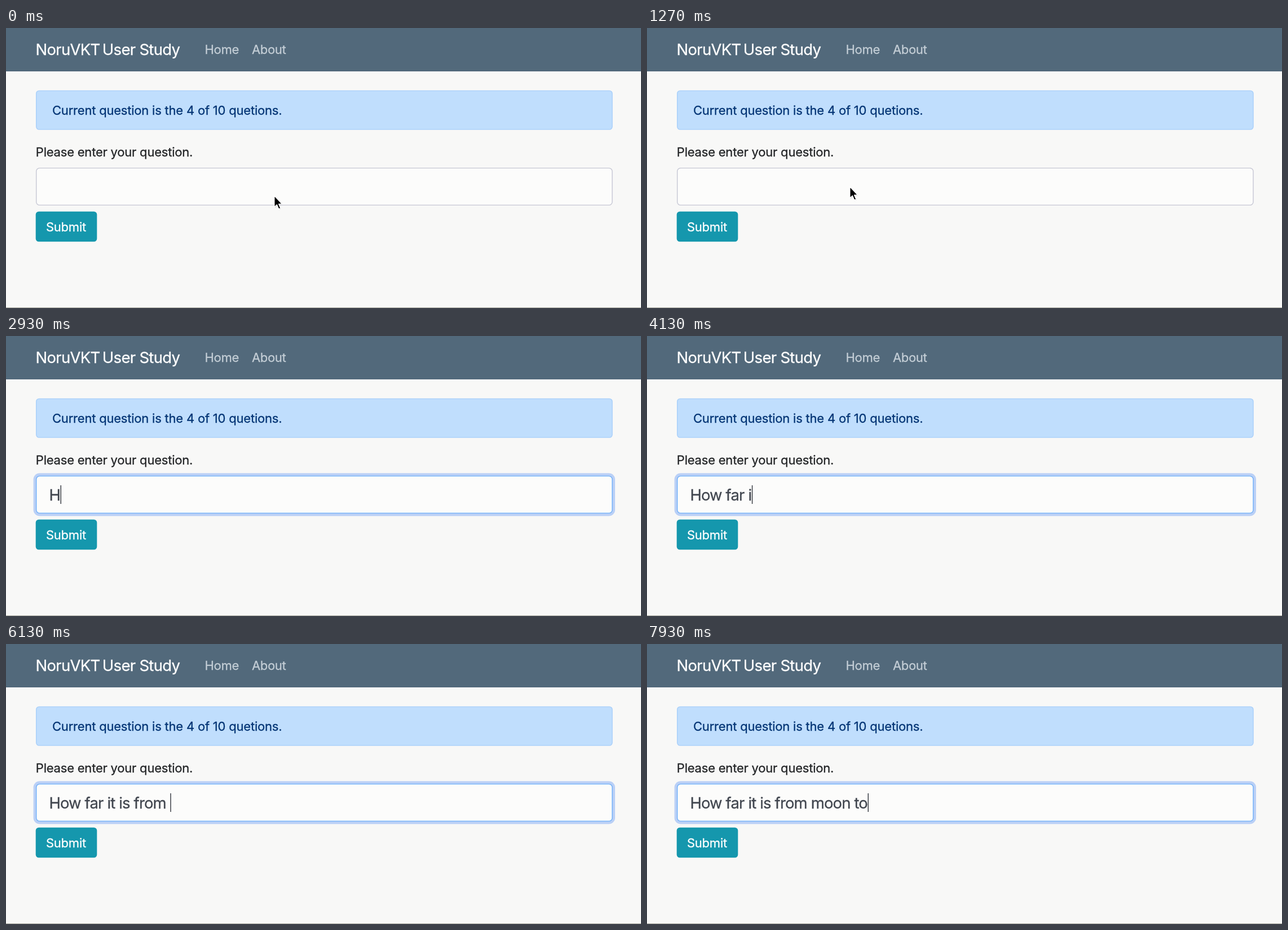
Animation of 1126x497 px, one loop 8 s. Source, as an HTML page:

```html
<!DOCTYPE html>
<html lang="en">
<head>
<meta charset="utf-8">
<title>User Study</title>
<style>
  html, body { margin: 0; width: 100%; height: 100%; overflow: hidden; background: #f8f8f7; }
  svg { display: block; width: 1126px; height: 497px; }
  text {
    font: 400 22px Inter, Roboto, "Liberation Sans", sans-serif;
    font-variation-settings: "opsz" 14;
    letter-spacing: -.21px;
    white-space: pre;
    fill: currentColor;
    stroke: currentColor;
    stroke-width: .3px;
  }
  .large { font-size: 27.5px; letter-spacing: -.86px; }
  .brand { letter-spacing: -.7px; }
  .nav { color: #c4ced6; letter-spacing: -.3px; }
</style>
</head>
<body>
<svg viewBox="0 0 1126 497">
  <rect width="1126" height="497" fill="#f8f8f7"/>
  <rect width="1126" height="77" fill="#52697b"/>
  <text class="large brand" x="52.5" y="48" color="#fff">NoruVKT <tspan x="170.8">User Study</tspan></text>
  <text class="nav" x="352.5" y="46">Home</text>
  <text class="nav" x="435.9" y="46">About</text>

  <rect x="53.7" y="111.4" width="1021.3" height="68.7" rx="5" fill="#c0defd" stroke="#a8cffa" stroke-width="1.4"/>
  <text x="82" y="154" color="#033474">Current question is the 4 of 10 quetions.</text>
  <text x="52.8" y="228" color="#222426">Please enter your question.</text>

  <rect id="ring" fill="#bad0f6"/>
  <rect id="field" x="53.7" y="248.6" width="1021.3" height="65.8" rx="6" fill="#fcfcfb" stroke-width="1.4"/>
  <text id="typed" class="large" x="76.4" y="291.5" color="#41464f"></text>
  <rect id="caret" y="265" width="1.4" height="33" fill="#30343b"/>

  <rect x="52.7" y="325.7" width="108.6" height="53.6" rx="5.5" fill="#1597ad"/>
  <text x="70.9" y="361" color="#fff">Submit</text>
  <rect y="496" width="1126" height="1" fill="#a6a69c"/>

  <defs>
    <path id="stem" d="M-5-11Q0-11 0-8Q0-11 5-11M0-8V8M-5 11Q0 11 0 8Q0 11 5 11M-2.5 3H2.5"/>
  </defs>
  <g id="arrow" stroke-linejoin="round">
    <path d="M1 1V22L5.4 18 8.6 25 12 23.6 8.8 16.6H14.5Z" fill="#000" opacity=".12"/>
    <path d="M0 0V20.5L4.6 16.3 7.8 23.8 11.2 22.4 8 15H14Z" fill="#000" stroke="#fff" stroke-width="1.5"/>
  </g>
  <g id="beam" fill="none" stroke-linecap="round">
    <use href="#stem" stroke="#fff" stroke-width="3.4"/>
    <use href="#stem" stroke="#111" stroke-width="1.7"/>
  </g>
</svg>
<script>
const LOOP = 8000, FOCUS = 1950, BEAM = 1750;
const TEXT = 'How far it is from moon to';
const KEYS = [2800, 2980, 3120, 3260, 3500, 3640, 3780, 3920, 4080, 4250, 4420, 4700, 4860,
  5030, 5330, 5470, 5630, 5800, 5980, 6400, 6600, 6780, 6980, 7200, 7580, 7870];
const PATH = [[0, 475.7, 297.5], [250, 475.7, 297.5], [1200, 359.7, 281.5], [1400, 359.7, 281.5], [1850, 340.3, 282]];

const el = id => document.getElementById(id);
const [ring, field, typed, caret, arrow, beam] =
  ['ring', 'field', 'typed', 'caret', 'arrow', 'beam'].map(el);

const clamp = v => Math.max(0, Math.min(1, v));
const ease = v => v * v * (3 - 2 * v);
const mix = (a, b, k) => a + (b - a) * k;
const show = (node, on) => node.setAttribute('visibility', on ? 'visible' : 'hidden');
const set = (node, attrs) => {
  for (const name in attrs) node.setAttribute(name, attrs[name]);
};

function pointerAt(t) {
  let i = 0;
  while (i < PATH.length - 2 && t >= PATH[i + 1][0]) i++;
  const [t0, x0, y0] = PATH[i], [t1, x1, y1] = PATH[i + 1];
  const k = ease(clamp((t - t0) / (t1 - t0)));
  return [mix(x0, x1, k), mix(y0, y1, k)];
}

function drawField(t) {
  const k = ease(clamp((t - FOCUS) / 150));
  const grow = 4.4 * k;
  const border = [[198, 110], [199, 175], [212, 249]].map(([a, b]) => Math.round(mix(a, b, k)));
  field.setAttribute('stroke', `rgb(${border})`);
  set(ring, {
    x: 53 - grow, y: 248 - grow, width: 1022.6 + 2 * grow, height: 67 + 2 * grow,
    rx: 6.6 + grow, opacity: k
  });
}

function drawText(t) {
  const count = KEYS.filter(key => t >= key).length;
  const value = TEXT.slice(0, count);
  if (typed.textContent !== value) typed.textContent = value;
  const since = t - (count ? KEYS[count - 1] : FOCUS);
  caret.setAttribute('x', 77 + (count ? typed.getComputedTextLength() : 0));
  show(caret, since >= 0 && since % 1000 < 500);
}

function drawPointer(t) {
  const [x, y] = pointerAt(t);
  for (const node of [arrow, beam]) node.setAttribute('transform', `translate(${x} ${y})`);
  show(arrow, t < BEAM);
  show(beam, t >= BEAM && t < KEYS[0]);
}

function frame() {
  const t = performance.now() % LOOP;
  drawField(t);
  drawText(t);
  drawPointer(t);
  requestAnimationFrame(frame);
}
frame();
</script>
</body>
</html>
```
